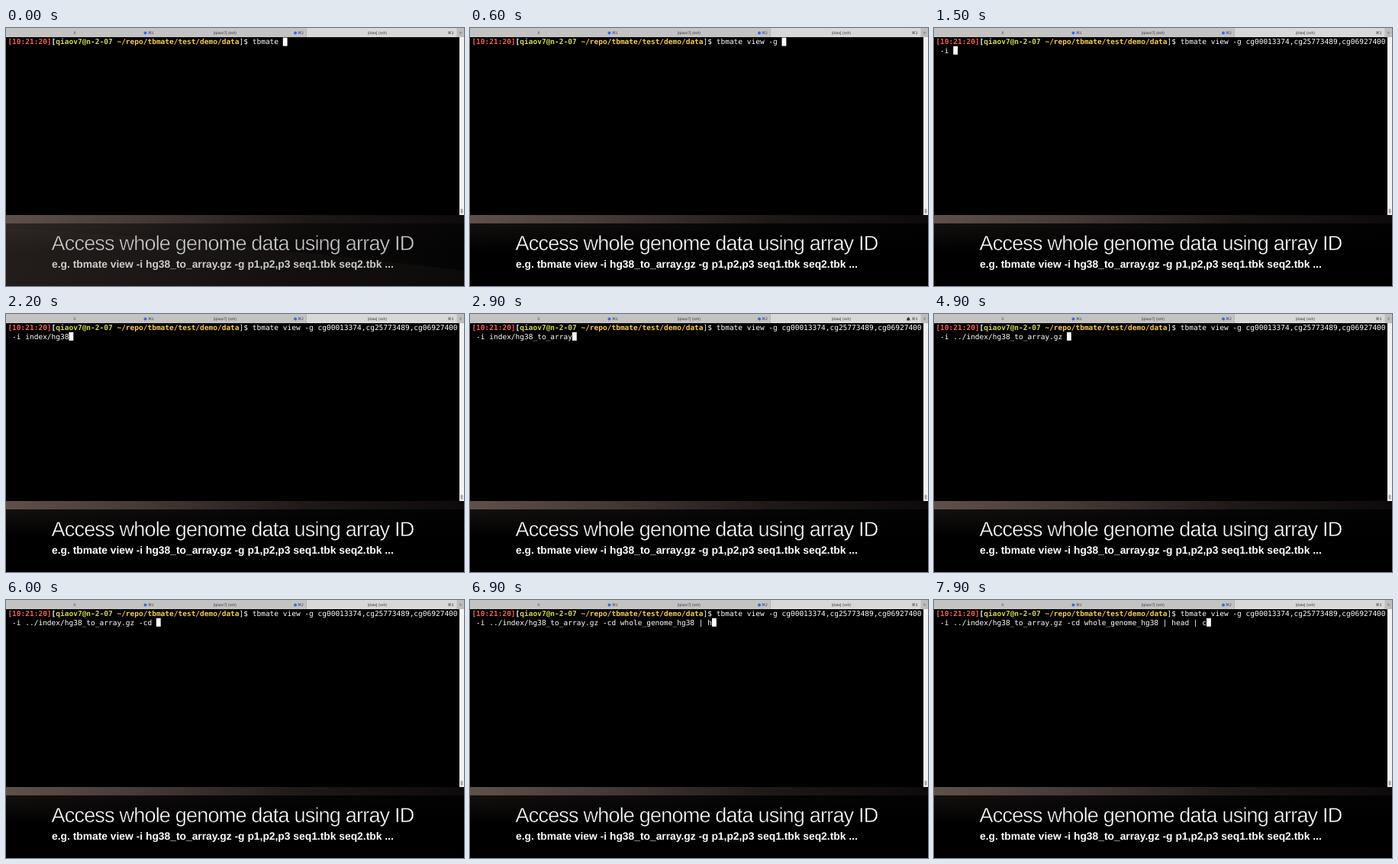
An HTML page that plays this animation: 600x338 px, repeating every 8000 ms.

```html
<!DOCTYPE html>
<html lang="en">
<head>
<meta charset="utf-8">
<title>Terminal demo</title>
<style>
  html, body { margin: 0; width: 100%; height: 100%; overflow: hidden; background: #000; }
  svg { display: block; width: 100vw; height: 100vh; }
  text { white-space: pre; text-rendering: geometricPrecision; }
  .tab { font: 5px "Liberation Sans", "DejaVu Sans", sans-serif; fill: #3c3c3c; text-anchor: middle; }
  .mono { font: 9.5px "DejaVu Sans Mono", monospace; fill: #fff; }
  .mono .b { font-weight: bold; }
  .time { fill: #f4605c; }
  .user { fill: #d2d653; }
  .path { fill: #f6cb52; }
  .title {
    font: 27px "Liberation Sans", sans-serif; letter-spacing: -.79px;
    fill: #fff; stroke: #000; stroke-width: .45px;
  }
  .sub { font: bold 13.84px "Liberation Sans", sans-serif; fill: #fff; }
</style>
</head>
<body>
<svg viewBox="0 0 600 338">
  <defs>
    <linearGradient id="desk">
      <stop offset="0" stop-color="#5f504a"/>
      <stop offset=".3" stop-color="#453936"/>
      <stop offset=".65" stop-color="#1f1918"/>
      <stop offset="1" stop-color="#0e0b0b"/>
    </linearGradient>
    <linearGradient id="beam">
      <stop offset="0" stop-color="#6a5a53" stop-opacity=".35"/>
      <stop offset="1" stop-color="#6a5a53" stop-opacity=".25"/>
    </linearGradient>
    <linearGradient id="panel" x2="0" y2="1">
      <stop offset="0" stop-opacity=".8"/>
      <stop offset=".45" stop-opacity="1"/>
    </linearGradient>
  </defs>

  <!-- desktop -->
  <rect y="245" width="600" height="93" fill="url(#desk)"/>
  <path d="M0 262Q250 276 600 318V338H0Z" fill="url(#beam)"/>

  <!-- terminal window -->
  <rect width="600" height="245" fill="#000"/>
  <rect width="600" height="12" fill="#c3c3c3"/>
  <rect x="393.5" width="206.5" height="12" fill="#d8d8d8"/>
  <rect x="590.5" width="9.5" height="12" fill="#bdbdbd"/>
  <path d="M593.5 6.2H597.5M595.5 4.2V8.2" stroke="#777" stroke-width=".6"/>
  <path d="M393.5 0V12" stroke="#a9a9a9" stroke-width=".7"/>
  <rect x="594" y="12" width="6" height="233" fill="#f2f2f2"/>
  <rect x="595.5" y="236.5" width="3" height="6.5" rx="1.5" fill="#a8a8a8"/>

  <g class="tab">
    <text x="90" y="8.3">X</text>
    <text x="190" y="8.3">⌘1</text>
    <text x="287" y="8.3">[qiaov7] (ssh)</text>
    <text x="386" y="8.3">⌘2</text>
    <text x="486.5" y="8.3">[data] (ssh)</text>
    <text x="582.5" y="8.3">⌘3</text>
  </g>
  <circle cx="182.5" cy="6.5" r="2" fill="#2f6bf0"/>
  <circle cx="379" cy="6.5" r="2" fill="#2f6bf0"/>
  <path id="bell" fill="#333" d="M571.6 8.3C572.7 7.4 572.2 4.4 574.3 4.2C576.4 4.4 575.9 7.4 577 8.3ZM573.5 8.7H575.1L574.3 9.5Z"/>

  <g class="mono">
    <text x="2.4" y="21.3"><tspan class="b time">[10:21:20]</tspan><tspan class="b">[</tspan><tspan class="b user">qiaov7@n-2-07 </tspan><tspan class="b path">~/repo/tbmate/test/demo/data</tspan>]$ <tspan id="row1"></tspan></text>
    <text id="row2" x="2.4" y="32.5"></text>
    <rect id="caret" width="5.8" height="11" fill="#fff"/>
    <text id="under" style="fill:#444"></text>
  </g>

  <!-- caption -->
  <rect id="cover" y="256" width="600" height="82" fill="url(#panel)"/>
  <g id="caption">
    <text class="title" x="59.5" y="291">Access whole genome data using array ID</text>
    <text class="sub" x="60" y="314">e.g. tbmate view -i hg38_to_array.gz -g p1,p2,p3 seq1.tbk seq2.tbk ...</text>
  </g>
</svg>
<script>
const LOOP = 8000, COLS = 103, PROMPT = 56, CELL = 5.72, LEFT = 2.4;
const FADE = 300;
const $ = id => document.getElementById(id);

// [ms, typed text] or [ms, caret move]
const keys = [
  [0, 'tbmate '], [100, 'v'], [200, 'i'], [300, 'ew'], [400, ' '], [500, '-'], [600, 'g '],
  [900, 'cg00013374,cg25773489,cg06927400'],
  [1000, ' '], [1300, '-'], [1400, 'i'], [1500, ' '],
  [1600, 'i'], [1700, 'nd'], [1800, 'ex'], [1900, '/'], [2000, 'h'], [2100, 'g3'],
  [2200, '8'], [2300, '_'], [2500, 't'], [2600, 'o'], [2800, '_array'], [3100, '.'],
  [3700, -6], [3800, -3], [3900, -5], [4000, -6],
  [4300, '.'], [4400, '.'], [4600, '/'], [4700, 20], [4900, 'gz '],
  [5700, '-'], [5800, 'c'], [5900, 'd'], [6000, ' '], [6100, 'w'], [6200, 'h'],
  [6500, 'ole_genome_hg38'], [6600, ' '], [6700, '|'], [6800, ' '], [6900, 'h'], [7000, 'e'],
  [7200, 'a'], [7300, 'd'], [7400, ' '], [7500, '|'], [7600, ' '], [7900, 'c']
];
const bells = [[2800, 3200], [3700, 4200]];

function lineAt(t) {
  let text = '', pos = 0;
  for (const [at, key] of keys) {
    if (at > t) break;
    if (typeof key === 'number') { pos += key; continue; }
    text = text.slice(0, pos) + key + text.slice(pos);
    pos += key.length;
  }
  return { text, pos };
}

function place(el, x, y) {
  el.setAttribute('x', x);
  el.setAttribute('y', y);
}

function draw(now) {
  const t = now % LOOP;
  const { text, pos } = lineAt(t);
  const split = COLS - PROMPT;
  $('row1').textContent = text.slice(0, split);
  $('row2').textContent = text.slice(split);

  const cell = PROMPT + pos, row = Math.floor(cell / COLS);
  const x = LEFT + cell % COLS * CELL;
  place($('caret'), x, 12.6 + row * 11.2);
  place($('under'), x, 21.3 + row * 11.2);
  $('under').textContent = text[pos] || '';

  const fade = Math.min(1, t / FADE);
  $('bell').style.opacity = bells.some(([on, off]) => t >= on && t < off) ? 1 : 0;
  $('caption').style.opacity = .78 + .22 * fade;
  $('cover').style.opacity = .65 + .35 * fade;
}

function tick() {
  draw(performance.now());
  requestAnimationFrame(tick);
}
tick();
</script>
</body>
</html>
```
